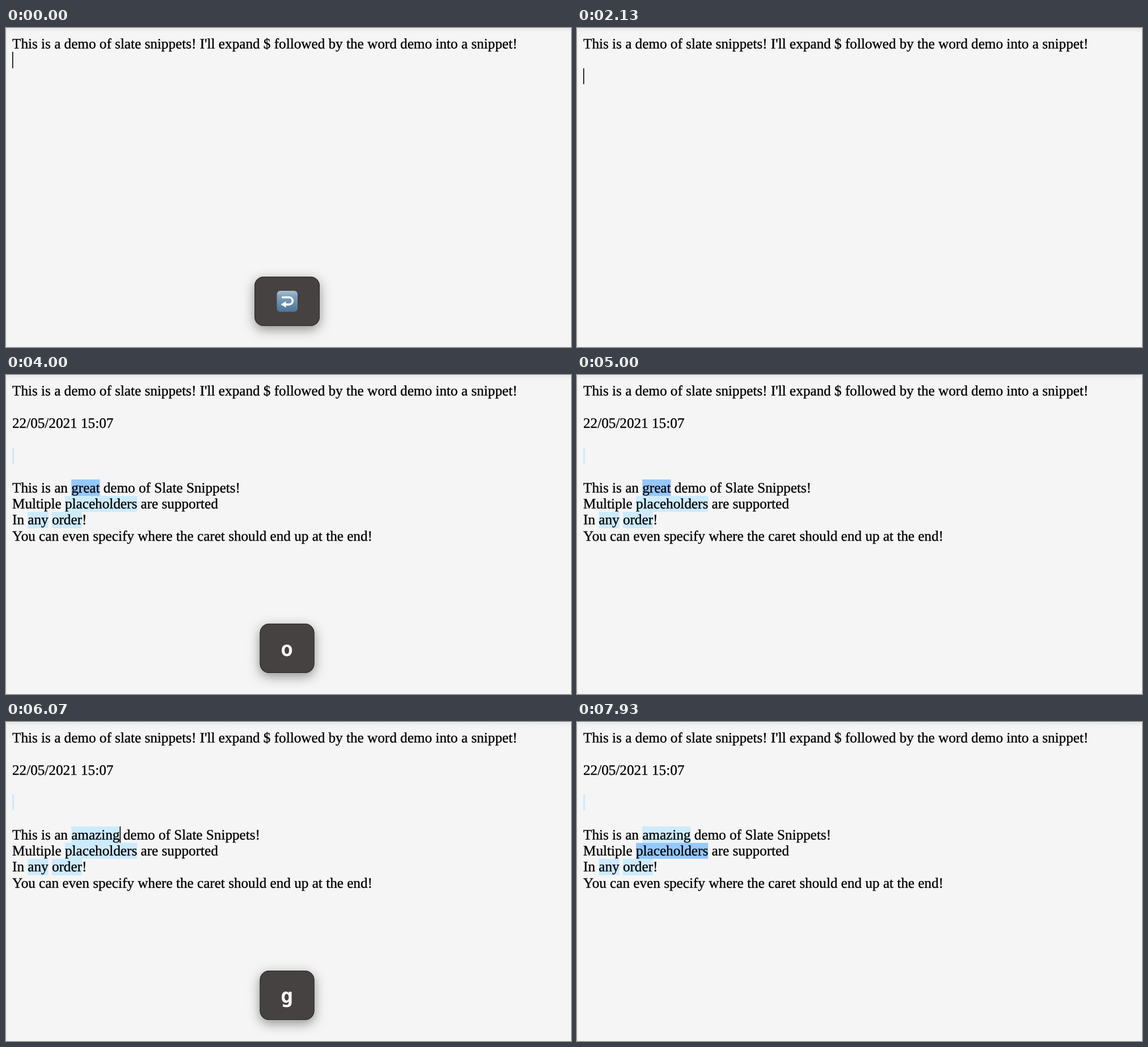
An HTML page with a canvas that plays this animation: 996 px wide and 562 px high, repeating every 8 s.

```html
<!DOCTYPE html>
<html lang="en">
<head>
<meta charset="utf-8">
<title>Snippet demo</title>
<style>
html, body { margin: 0; width: 100%; height: 100%; overflow: hidden; background: #f5f5f5; }
canvas { display: block; width: 996px; height: 562px; }
</style>
</head>
<body>
<canvas id="stage"></canvas>
<script>
const W = 996, H = 562, LOOP = 8000;
const LEFT = 11, TOP = 14, LINE = 28.4, BASE = 22.1;
const SERIF = '25.18px "Liberation Serif", Times, serif';
const MONO = 'bold 36px "DejaVu Sans Mono", monospace';
const PALE = '#cdebff', SELECTED = '#94c8ff';
const HOLD = 460, ENTER = '\u21a9', TAB = '\u21e5';
const INTRO = "This is a demo of slate snippets! I'll expand $ followed by the word demo into a snippet!";

// Key presses: time and key
const presses = [
  [-100, ENTER], [130, ENTER], [2600, '$'], [3130, 'd'], [3400, 'e'], [3530, 'm'], [3870, 'o'],
  [5400, 'a'], [5470, 'm'], [5600, 'a'], [5800, 'z'], [5870, 'i'], [6000, 'n'], [6070, 'g'],
  [6730, TAB]
];
const EXPAND = 3930, SELECT = 4000, REPLACE = 5400, NEXT = 6730;

// Times at which the caret shows or hides, starting shown
const blinks = [600, 1130, 1600, 2130, 3070, 3130, 3930, 5400, 6600];

const canvas = document.getElementById('stage');
const ctx = canvas.getContext('2d');
const dpr = window.devicePixelRatio || 1;
canvas.width = W * dpr;
canvas.height = H * dpr;

const typed = (t, from, to) => presses
  .filter(([at]) => at >= from && at < to && at <= t).map(p => p[1]).join('');

function rect(x, y, w, h, color) {
  ctx.fillStyle = color;
  ctx.fillRect(x, y, w, h);
}

// Fills part of a text row, snapped to whole pixels vertically
function rowRect(row, x, w, color) {
  const y = Math.round(TOP + row * LINE);
  rect(x, y, w, Math.round(TOP + (row + 1) * LINE) - y, color);
}

function drawPage() {
  rect(0, 0, W, H, '#f5f5f5');
  const top = ctx.createLinearGradient(0, 1, 0, 9);
  top.addColorStop(0, '#e2e2e2');
  top.addColorStop(0.3, '#eeeeee');
  top.addColorStop(1, '#f5f5f5');
  rect(0, 1, W, 8, top);
  rect(0, 0, W, 1, '#f8f8f8');
  const side = ctx.createLinearGradient(0, 0, 4, 0);
  side.addColorStop(0, '#ececec');
  side.addColorStop(1, 'rgba(245,245,245,0)');
  rect(0, 2, 4, H, side);
}

// Draws [text, background] runs on a row and returns the end x
function drawRow(row, ...runs) {
  ctx.font = SERIF;
  ctx.textAlign = 'left';
  ctx.lineWidth = 0.35;
  ctx.strokeStyle = '#000';
  const y = TOP + row * LINE + BASE;
  let x = LEFT;
  for (const [text, back] of runs) {
    const w = ctx.measureText(text).width;
    if (back) rowRect(row, x, w, back);
    ctx.fillStyle = '#000';
    ctx.fillText(text, x, y);
    ctx.strokeText(text, x, y);
    x += w;
  }
  return x;
}

function drawCaret(t, row, x) {
  const hidden = blinks.filter(b => b <= t).length % 2;
  if (!hidden) rowRect(row, x, 1.6, '#000');
}

function drawText(t) {
  drawRow(0, [INTRO]);
  if (t < EXPAND) {
    const x = drawRow(2, [typed(t, 2600, EXPAND)]);
    drawCaret(t, t < 130 ? 1 : 2, x);
    return;
  }
  const word = t < REPLACE ? 'great' : typed(t, REPLACE, NEXT);
  const first = t >= SELECT && t < REPLACE ? SELECTED : PALE;
  drawRow(2, ['22/05/2021 15:07']);
  rowRect(4, LEFT, 3.2, PALE);
  drawRow(6, ['This is an '], [word, first], [' demo of Slate Snippets!']);
  drawRow(7, ['Multiple '], ['placeholders', t < NEXT ? PALE : SELECTED], [' are supported']);
  drawRow(8, ['In '], ['any', PALE], [' '], ['order', PALE], ['!']);
  drawRow(9, ['You can even specify where the caret should end up at the end!']);
  if (t >= REPLACE && t < NEXT) {
    drawCaret(t, 6, LEFT + ctx.measureText('This is an ' + word).width);
  }
}

function box(x, y, w, h, r) {
  ctx.beginPath();
  ctx.roundRect(x, y, w, h, r);
}

function drawEnter() {
  const g = ctx.createLinearGradient(0, 463, 0, 500);
  g.addColorStop(0, '#a9c2d4');
  g.addColorStop(0.25, '#7fa3bf');
  g.addColorStop(1, '#4c7396');
  ctx.fillStyle = g;
  box(477.5, 463, 36.5, 37, 6);
  ctx.fill();
  ctx.strokeStyle = ctx.fillStyle = '#fff';
  ctx.lineWidth = 3.6;
  ctx.beginPath();
  ctx.moveTo(486, 474.5);
  ctx.lineTo(499, 474.5);
  ctx.arc(499, 480.8, 6.3, -Math.PI / 2, Math.PI / 2);
  ctx.lineTo(492, 487.1);
  ctx.stroke();
  ctx.beginPath();
  ctx.moveTo(484.5, 487.1);
  ctx.lineTo(493.5, 481.6);
  ctx.lineTo(493.5, 492.6);
  ctx.fill();
}

function drawTab() {
  rect(485.5, 483, 10, 3.6, '#fff');
  ctx.beginPath();
  ctx.moveTo(493.5, 478);
  ctx.lineTo(502, 484.8);
  ctx.lineTo(493.5, 491.6);
  ctx.fill();
  rect(501.5, 478, 3, 13.6, '#fff');
}

function drawKey(t) {
  const [at, key] = presses.filter(p => p[0] <= t).pop();
  if (t >= at + HOLD) return;
  const w = key === ENTER ? 115 : 96;
  const y = key === TAB ? 440 : 438;
  const x = 495.5 - w / 2;
  ctx.save();
  ctx.shadowColor = 'rgba(0,0,0,0.42)';
  ctx.shadowBlur = 20 * dpr;
  ctx.shadowOffsetY = 6 * dpr;
  ctx.fillStyle = '#474242';
  box(x, y, w, 525 - y, 16);
  ctx.fill();
  ctx.restore();
  ctx.strokeStyle = '#2b2828';
  ctx.lineWidth = 1;
  box(x + 0.5, y + 0.5, w - 1, 524 - y, 15.5);
  ctx.stroke();
  if (key === ENTER) return drawEnter();
  ctx.fillStyle = '#fff';
  if (key === TAB) return drawTab();
  ctx.font = MONO;
  ctx.textAlign = 'center';
  ctx.fillText(key, 495, 494.5);
}

function frame(now) {
  const t = now % LOOP;
  ctx.setTransform(dpr, 0, 0, dpr, 0, 0);
  ctx.textRendering = 'geometricPrecision';
  drawPage();
  drawText(t);
  drawKey(t);
  requestAnimationFrame(frame);
}
requestAnimationFrame(frame);
</script>
</body>
</html>
```
